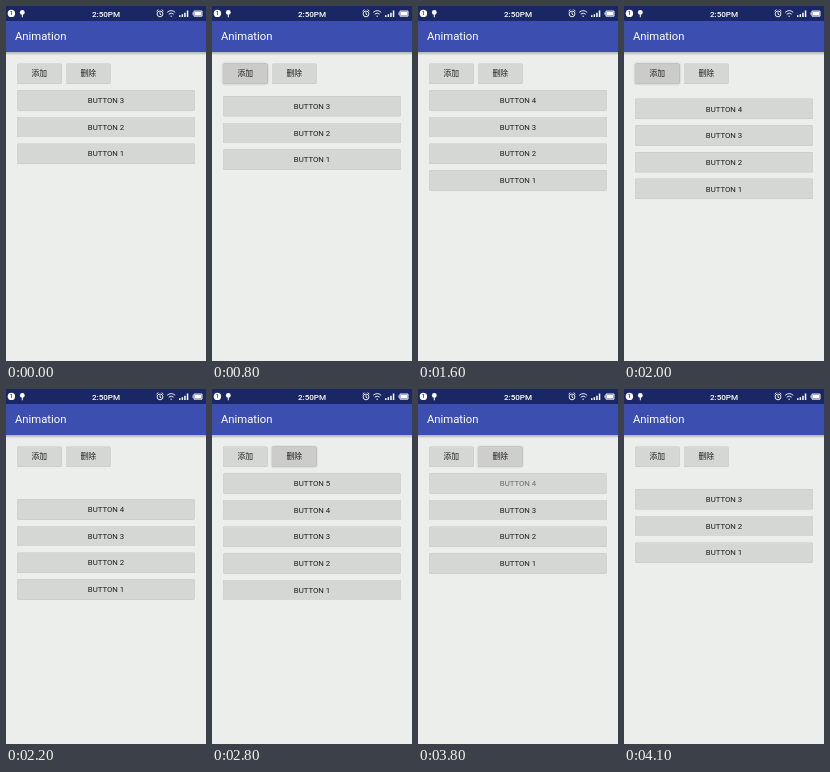
An HTML page for the animation above (4.2 s loop, 200 px wide and 355 px high).

```html
<!DOCTYPE html>
<html lang="zh-CN">
<head>
<meta charset="utf-8">
<title>Animation</title>
<style>
html, body { margin: 0; width: 100%; height: 100%; overflow: hidden; background: #eceeec; }
svg { display: block; width: 100%; height: 100%; }
text { font-family: Roboto, "Noto Sans CJK SC", "Noto Sans CJK", sans-serif; }
.button rect { fill: #d5d7d4; filter: drop-shadow(0 .8px .6px rgba(0, 0, 0, .32)); }
.button .pressed { fill: #cbccca; filter: drop-shadow(0 .8px .9px rgba(0, 0, 0, .3)); opacity: 0; }
.button text { font-size: 7.8px; fill: #1c1c1c; text-anchor: middle; }
.line { fill: none; stroke: #fff; stroke-width: .9; }
</style>
</head>
<body>
<svg id="stage" viewBox="0 0 200 355" preserveAspectRatio="none">
  <defs>
    <linearGradient id="shade" x2="0" y2="1">
      <stop stop-opacity=".25"/>
      <stop offset="1" stop-opacity="0"/>
    </linearGradient>
  </defs>
  <rect width="200" height="355" fill="#eceeec"/>
  <g id="buttons"></g>
  <rect y="46" width="200" height="3.5" fill="url(#shade)"/>
  <rect y="15" width="200" height="31" fill="#3c4fb1"/>
  <rect width="200" height="15" fill="#1a2765"/>
  <text x="8.9" y="34.3" font-size="11.3" fill="#fff">Animation</text>

  <g fill="#fff">
    <circle cx="5.4" cy="7.4" r="3.7"/>
    <text x="5.4" y="9.4" font-size="5.5" font-weight="500" text-anchor="middle" style="fill:#1a2765">1</text>
    <circle cx="16.3" cy="6.4" r="2.4"/>
    <path d="M15.8 8h1v3.2h-1z"/>
    <text x="100" y="10.6" font-size="8.1" font-weight="500" text-anchor="middle">2:50PM</text>
    <path d="M173 9.3h1.5v1.7h-1.5zM175.6 8.3h1.5v2.7h-1.5zM178.2 6.8h1.5v4.2h-1.5zM180.8 4.6h1.5v6.4h-1.5z"/>
    <rect x="188.6" y="5.7" width="6.8" height="3.8"/>
  </g>
  <g class="line">
    <circle cx="154" cy="7.9" r="2.9"/>
    <path d="M154 6.2v2l1.4 .8M150.6 5.2l1.8 -1.6M157.4 5.2l-1.8 -1.6"/>
    <path d="M161.2 6.3q4 -3.4 8 0M162.7 8.2q2.5 -2.2 5 0M164.4 10.2h1.6"/>
    <path d="M188 5h8v5.2h-8zM187 6.4v2.4"/>
  </g>
</svg>
<script>
const LOOP = 4200, STEP = 100, PITCH = 26.67, ROW_TOP = 84.4;
const list = document.getElementById('buttons');

function button(label, x, y, width) {
  const g = document.createElementNS('http://www.w3.org/2000/svg', 'g');
  const box = `width="${width}" height="20" rx="1.1"`;
  g.setAttribute('class', 'button');
  g.setAttribute('transform', `translate(${x} ${y})`);
  g.innerHTML = `<rect ${box}/><rect class="pressed" ${box}/>
    <text x="${width / 2}" y="12.7">${label}</text>`;
  list.append(g);
  return g;
}

const add = button('添加', 11.1, 57.8, 44.4);
const remove = button('删除', 60, 57.8, 44.4);
const rows = [1, 2, 3, 4, 5].map(n => button('BUTTON ' + n, 11.1, 0, 177.8));

const progress = (t, start, length = 300) => Math.min(1, Math.max(0, (t - start) / length));
const decelerate = (t, start) => 1 - (1 - progress(t, start)) ** 2;
const smooth = (t, start) => (1 - Math.cos(Math.PI * progress(t, start))) / 2;
const press = (t, start) => progress(t, start, 60) - progress(t, start + 200, 130);

function setOpacity(g, part, amount) {
  g.querySelector(part).style.opacity = amount;
}

function draw(t) {
  // Number of row slots currently open, fractional while rows slide
  const slots = 3 + decelerate(t, 765) + decelerate(t, 1948)
    - decelerate(t, 3101) - decelerate(t, 4032);
  const alpha = [1, 1, 1,
    smooth(t, 1065) - smooth(t, 3665),
    smooth(t, 2248) - smooth(t, 2780)];
  rows.forEach((row, i) => {
    const y = ROW_TOP + PITCH * (slots - i - 1);
    row.setAttribute('transform', `translate(11.1 ${y})`);
    // The shadow showing through keeps a fading box darker than its label
    setOpacity(row, 'rect', 1 - (1 - alpha[i]) ** 3);
    setOpacity(row, 'text', alpha[i]);
  });
  setOpacity(add, '.pressed', press(t, 650) + press(t, 1850));
  setOpacity(remove, '.pressed', press(t, 2750) + press(t, 3560));
}

const begin = performance.now();
function tick() {
  const t = (performance.now() - begin) % LOOP;
  draw(Math.floor(t / STEP) * STEP);
  requestAnimationFrame(tick);
}
tick();
</script>
</body>
</html>
```
